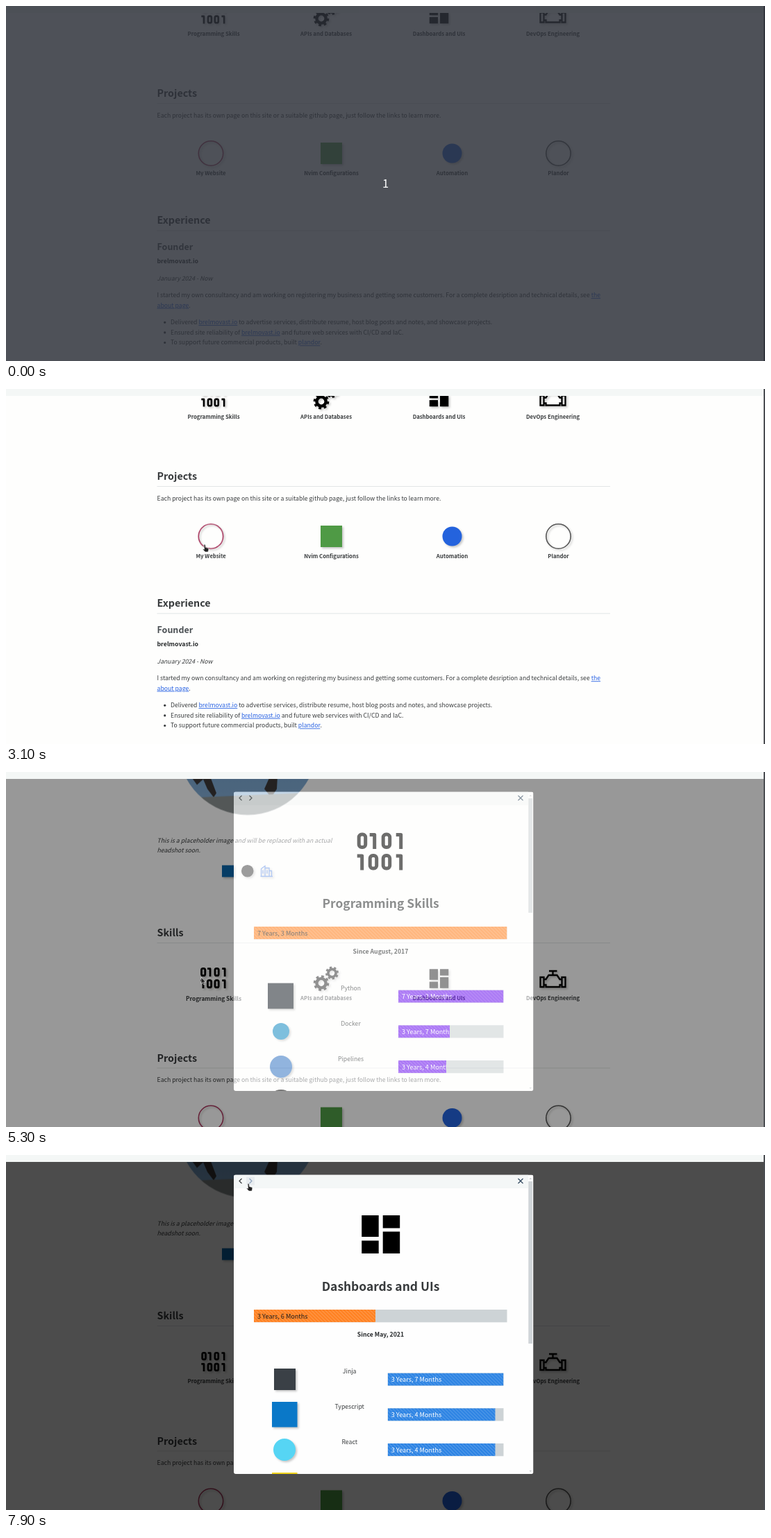
These frames come from a looping animation (1093x512 px, 8 s). An HTML page:

```html
<!DOCTYPE html>
<html lang="en">
<head>
<meta charset="utf-8">
<title>Portfolio walkthrough</title>
<style>
html, body { margin: 0; width: 100%; height: 100%; overflow: hidden; background: #fefefd; }
svg#stage { display: block; width: 100vw; height: 100vh; }
text { font-family: "Noto Sans CJK JP", "Noto Sans CJK SC", "Noto Sans CJK KR", "Noto Sans CJK TC", "Noto Sans CJK", "Noto Sans", sans-serif; fill: #373a3c; white-space: pre; }
.b { font-weight: 700; }
.i { font-style: italic; }
.m { text-anchor: middle; }
.link { fill: #2761e3; text-decoration: underline; }
.term text { font-family: "Noto Sans Mono", "DejaVu Sans Mono", monospace; font-size: 7.675px; font-weight: 700; fill: #f2b81f; }
.icon { filter: drop-shadow(2px 2px 1.5px rgba(0, 0, 0, .22)); }
.line { fill: none; stroke: #000; }

.scroll, .site, .skill, .dialog, .pointer { animation: 8s linear infinite; }
.count, .term, .status, .arrow, .hand, .next, .p0, .p1, .p2 { animation: 8s step-end infinite; }
.scroll { animation-name: scroll; }
.site { animation-name: site; }
.skill { animation-name: skill; }
.dialog { animation-name: dialog; }
.pointer { animation-name: pointer; }
.count { animation-name: count; }
.term { animation-name: term; }
.status { animation-name: status; }
.arrow { animation-name: arrow; }
.hand { animation-name: hand; }
.next { animation-name: next; }
.p0 { animation-name: p0; }
.p1 { animation-name: p1; }
.p2 { animation-name: p2; }
.stripes { animation: stripes 1s linear infinite; }

@keyframes count { 0% { opacity: 1 } 1.25%, 100% { opacity: 0 } }
@keyframes term { 0% { opacity: 0 } 6.25% { opacity: 1 } 22.5%, 100% { opacity: 0 } }
@keyframes status { 0% { opacity: 0 } 40% { opacity: 1 } 57.5%, 100% { opacity: 0 } }
@keyframes scroll {
  0%, 47.8% { transform: translateY(0) }
  50% { transform: translateY(76.5px) }
  52.5% { transform: translateY(205px) }
  55%, 100% { transform: translateY(286.5px) }
}
@keyframes site {
  0%, 38.75% { transform: none }
  43.75%, 51.25% { transform: translateY(-15.7px) scale(1.2) }
  55%, 100% { transform: none }
}
@keyframes skill {
  0%, 60% { transform: none }
  63.75% { transform: translateY(-8px) scale(1.15) }
  66.25% { transform: translateY(-1px) scale(1.07) }
  68.75%, 100% { transform: none }
}
@keyframes dialog { 0%, 63.75% { opacity: 0 } 66.25% { opacity: .57 } 67.5%, 100% { opacity: 1 } }
@keyframes p0 { 0% { opacity: 1 } 91.25%, 100% { opacity: 0 } }
@keyframes p1 { 0% { opacity: 0 } 91.25% { opacity: 1 } 96.25%, 100% { opacity: 0 } }
@keyframes p2 { 0% { opacity: 0 } 96.25%, 100% { opacity: 1 } }
@keyframes next { 0% { opacity: 0 } 87.5%, 100% { opacity: 1 } }
@keyframes arrow {
  0% { opacity: 0 } 28.75% { opacity: 1 } 38.75% { opacity: 0 } 53.75% { opacity: 1 }
  60% { opacity: 0 } 64.4% { opacity: 1 } 87.5%, 100% { opacity: 0 }
}
@keyframes hand {
  0% { opacity: 0 } 38.75% { opacity: 1 } 53.75% { opacity: 0 } 60% { opacity: 1 }
  64.4% { opacity: 0 } 87.5%, 100% { opacity: 1 }
}
@keyframes pointer {
  0%, 28.75% { transform: translate(545px, 30px) }
  38.75%, 57.5% { transform: translate(284px, 224px) }
  62.5%, 68.75% { transform: translate(281px, 296px) }
  78.75% { transform: translate(392px, 62px) }
  82.5% { transform: translate(388px, 45px) }
  88.75%, 100% { transform: translate(347px, 41px) }
}
@keyframes stripes { from { transform: translateX(5px) } to { transform: none } }
</style>
</head>
<body>
<svg id="stage" viewBox="0 0 1093 512" preserveAspectRatio="none">
  <defs>
    <pattern id="hatch" width="5" height="5" patternUnits="userSpaceOnUse">
      <path d="M0 0H2.5L5 2.5V5zM0 2.5V5H2.5z" fill="#fff" fill-opacity=".17"/>
    </pattern>
    <linearGradient id="sky" x1="0" y1="0" x2="0" y2="1">
      <stop offset="0" stop-color="#5f94cc"/><stop offset="1" stop-color="#86aed3"/>
    </linearGradient>
    <clipPath id="round"><circle cx="348" cy="-325" r="100.5"/></clipPath>
    <clipPath id="box"><rect x="328" y="28.5" width="431.5" height="431.5" rx="3"/></clipPath>

    <g id="zero"><rect x="2.5" y="2.5" width="9.5" height="18.5" rx="4" class="line" stroke-width="5"/></g>
    <g id="one"><path d="M0 3H7V23.5" class="line" stroke-width="5" stroke-linejoin="round"/></g>
    <g id="binary">
      <use href="#zero" x="-34" y="-27"/><use href="#one" x="-16" y="-27"/>
      <use href="#zero" x="1" y="-27"/><use href="#one" x="22" y="-27"/>
      <use href="#one" x="-34" y="3.5"/><use href="#zero" x="-18" y="3.5"/>
      <use href="#zero" x="1" y="3.5"/><use href="#one" x="22" y="3.5"/>
    </g>
    <g id="cog" class="line">
      <circle r="6.6" stroke-width="4.4"/>
      <circle r="9.6" stroke-width="3.4" pathLength="16" stroke-dasharray="1"/>
    </g>
    <g id="gears">
      <use href="#cog" transform="translate(-7 6.5)"/>
      <use href="#cog" transform="translate(8.5 -8) rotate(20) scale(.84)"/>
    </g>
    <path id="board" d="M-27.5-27.5h24.5v31h-24.5zM3-27.5h24.5v18.5h-24.5zM-27.5 9h24.5v18.5h-24.5zM3-4h24.5v31.5h-24.5z"/>
    <path id="valve" class="line" stroke-width="2.3" d="M-5.5-11H6M0-11V-5M-18-2h5v14h-5zM13-2h5v14h-5zM-13 1h3l4-6H6l4 6h3M-13 9h3v3H10v-3h3"/>
  </defs>
</svg>
<script>
const INK = '#373a3c';
const text = (x, y, size, str, cls = '', fill = '') =>
  `<text x="${x}" y="${y}" font-size="${size}" class="${cls}"${fill && ` style="fill:${fill}"`}>${str}</text>`;
const rect = (x, y, w, h, fill, more = '') =>
  `<rect x="${x}" y="${y}" width="${w}" height="${h}" fill="${fill}" ${more}/>`;
const disc = (x, y, r, fill, more = '') => `<circle cx="${x}" cy="${y}" r="${r}" fill="${fill}" ${more}/>`;
const ring = color => disc(0, 0, 17.7, 'none', `stroke="${color}" stroke-width="1.6"`);
const use = (id, scale, x = 0, y = 0) => `<use href="#${id}" transform="translate(${x} ${y}) scale(${scale})"/>`;
const link = str => `<tspan class="link">${str}</tspan>`;

const card = (x, y, label, icon, cls = '') =>
  `<g transform="translate(${x} ${y})"><g class="${cls}"><g class="icon">${icon}</g>${text(0, 31, 7.77, label, 'b m')}</g></g>`;
const heading = (y, str) => text(217.5, y, 14.3, str, 'b') + rect(217.5, y + 9, 652.5, 1, '#e2e5e6');

const page = `<g class="scroll">
  <g clip-path="url(#round)">
    ${rect(247, -426, 202, 202, 'url(#sky)')}
    <path d="M252-300L275-268L284-276L290-262L299-250L303-256L294-280H380L372-262L382-250L390-262L392-300z" fill="#3b3838"/>
    <path d="M280-250L420-256L440-220H280z" fill="#8a9192"/>
  </g>
  ${text(217.5, -184.7, 8.71, 'This is a placeholder image and will be replaced with an actual', 'i')}
  ${text(217.5, -171, 8.71, 'headshot soon.', 'i')}
  <g class="icon">
    ${rect(311, -152, 17, 17, '#0a66a8')}
    ${disc(347.7, -143.7, 8.8, '#1b1b1b')}
    <path d="M367.5-136V-147L373-151V-136M373-148H379V-136M379-144H382.5V-136M366.5-136H384M370-145v5M376-145v5" fill="none" stroke="#4d83e6" stroke-width="1.3"/>
  </g>
  ${heading(-49.5, 'Skills')}
  ${card(299, 11.5, 'Programming Skills', use('binary', .52), 'skill')}
  ${card(461, 11.5, 'APIs and Databases', use('gears', 1))}
  ${card(623.5, 11.5, 'Dashboards and UIs', use('board', .5))}
  ${card(787.5, 11.5, 'DevOps Engineering', use('valve', 1))}
  ${heading(131, 'Projects')}
  ${text(217.5, 160.5, 8.71, 'Each project has its own page on this site or a suitable github page, just follow the links to learn more.')}
  ${card(295, 212.5, 'My Website', ring('#a8395f'), 'site')}
  ${card(468.5, 212.5, 'Nvim Configurations', rect(-15.5, -15.5, 31, 31, '#4f9a45'))}
  ${card(642.5, 212.5, 'Automation', disc(0, 0, 14, '#2463dd'))}
  ${card(795.5, 212.5, 'Plandor', ring('#555'))}
  ${heading(314.3, 'Experience')}
  ${text(217.5, 352, 12.5, 'Founder', 'b', '#4b5054')}
  ${text(217.5, 371.2, 8.73, 'brelmovast.io', 'b', '#26292b')}
  ${text(217.5, 395.5, 8.71, 'January 2024 - Now', 'i')}
  ${text(217.5, 420.3, 8.71, 'I started my own consultancy and am working on registering my business and getting some customers. For a complete desription and technical details, see ' + link('the'))}
  ${text(217.5, 434.6, 8.71, link('about page') + '.')}
  ${[
    `Delivered ${link('brelmovast.io')} to advertise services, distribute resume, host blog posts and notes, and showcase projects.`,
    `Ensured site reliability of ${link('brelmovast.io')} and future web services with CI/CD and IaC.`,
    `To support future commercial products, built ${link('plandor')}.`
  ].map((str, n) => disc(228.7, 456.3 + 14.6 * n, 1.6, INK) + text(237, 459.2 + 14.6 * n, 8.71, str)).join('')}
</g>
${rect(0, 0, 1091, 10, '#f4f7f6')}
<g class="status">
  <path d="M0 502H57q3 0 3 3V512H0z" fill="#1c1c20"/>
  ${text(-1, 510, 8.2, 'localhost:3000', '', '#e8e8e8')}
</g>`;

/* Clipped progress bar with running stripes */
const bar = (x, y, w, done, color, label, ink) => `${rect(x, y, w, 18.3, '#cdd3d6')}
  <svg x="${x}" y="${y}" width="${done}" height="18.3">
    ${rect(0, 0, done, 18.3, color)}
    ${rect(-5, 0, done + 10, 18.3, 'url(#hatch)', 'class="stripes"')}
    ${text(5, 12.8, 9.1, label, '', ink)}
  </svg>`;

const panel = (n, p) => `<g class="p${n}">
  ${use(p.icon, p.scale, 539.7, 114.5)}
  ${text(539.5, 196, 17.4, p.title, 'b m')}
  ${bar(357, 223, 364.5, p.done, '#ff7e1c', p.total, '#1c1c1c')}
  ${text(539.5, 261.5, 8.7, 'Since ' + p.since, 'b m', '#26292b')}
  <g class="icon">${p.badges}</g>
  ${p.rows.map(([name, done, label], k) => {
    const y = 314.4 + 50.8 * k;
    return text(p.labelX, y + .6, 8.71, name, 'm') + bar(p.barX, y, 716.5 - p.barX, done, p.color, label, '#fff');
  }).join('')}
  ${rect(752.3, 38, 5.7, p.thumb, '#d0d5d8')}
</g>`;

const panels = [
  {
    icon: 'binary', scale: 1, title: 'Programming Skills', done: 364.5, total: '7 Years, 3 Months',
    since: 'August, 2017', thumb: 165, color: '#6a10f0', labelX: 496.5, barX: 565,
    badges: rect(377, 304.5, 37, 37, '#242a33') + disc(396, 374, 12, '#1e8fc6') + disc(396, 425, 16, '#3f7cc8') + disc(396, 476, 18, '#111'),
    rows: [['Python', 151.5, '7 Years, 3 Months'], ['Docker', 74, '3 Years, 7 Months'], ['Pipelines', 69, '3 Years, 4 Months']]
  },
  {
    icon: 'gears', scale: 1.5, title: 'APIs and Databases', done: 182, total: '3 Years, 7 Months',
    since: 'April, 2021', thumb: 200, color: '#3fb618', labelX: 495.5, barX: 557,
    badges: disc(398, 323, 17, '#159588') + disc(398, 374, 15, '#2d6a8d') + rect(383, 410, 30, 30, '#3d8b45'),
    rows: [['FastAPI', 159.5, '3 Years, 7 Months'], ['MySQL', 150, '3 Years, 4 Months'], ['MongoDB', 150, '3 Years, 4 Months']]
  },
  {
    icon: 'board', scale: 1, title: 'Dashboards and UIs', done: 175, total: '3 Years, 6 Months',
    since: 'May, 2021', thumb: 234, color: '#2780e3', labelX: 494.7, barX: 549.7,
    badges: rect(386, 308, 31, 31, '#3a4046') + rect(383, 356, 36.5, 36.5, '#0a78c8') + disc(401, 425, 16, '#56d5f4') + rect(383, 458, 36.5, 36.5, '#f2d51d'),
    rows: [['Jinja', 166.8, '3 Years, 7 Months'], ['Typescript', 155, '3 Years, 4 Months'], ['React', 155, '3 Years, 4 Months']]
  }
];

const stroke = (d, color, w = 1.2) => `<path d="${d}" fill="none" stroke="${color}" stroke-width="${w}"/>`;
const dialog = `<g class="dialog">
  ${rect(0, 10, 1091, 502, '#000', 'fill-opacity=".7"')}
  <g clip-path="url(#box)">
    ${rect(328, 28.5, 431.5, 431.5, '#fefefe')}
    ${rect(328, 28.5, 424, 19.5, '#f4f7f7')}
    ${stroke('M339.5 34L336 37.5L339.5 41M350.5 34L354 37.5L350.5 41', INK)}
    <g class="next">${rect(346, 31.5, 12, 12, '#e8ecef')}${stroke('M350.5 34L354 37.5L350.5 41', '#8ea4bd')}</g>
    ${stroke('M737.5 34L744.5 41M744.5 34L737.5 41', '#31475e')}
    <path d="M753.5 35h3.5l-1.75-2zM753.5 455h3.5l-1.75 2z" fill="#c4c9cc"/>
    ${panels.map((p, n) => panel(n, p)).join('')}
  </g>
</g>`;

const slash = '/';
const clip = 'output.gif';
const peek = "'Peek 2024-11-11 15-48.gif'";
const done = '... Done';
const repo = `http:${slash.repeat(2)}us.archive.ubuntu.com/ubuntu jammy/universe amd64`;
const clipPath = `/home/marlon/Videos/${clip}`;
const tint = (color, str) => `<tspan style="fill:${color}">${str}</tspan>`;
const lines = `    Metadata:
      title           : Video
      encoder         : Lavc58.134.100 gif
frame=  235 fps= 73 q=-0.0 Lsize=    5642kB time=00:00:15.25 bitrate=3031.0kbits/s speed= 4.7x
video:5642kB audio:0kB subtitle:0kB other streams:0kB global headers:0kB muxing overhead: 0.000346%
  open ${clip}
  sudo apt install peel
Reading package lists${done}
Building dependency tree${done}
Reading state information${done}
${tint('#d0342c', 'E:')} Unable to locate package peel
  sudo apt install peek
Reading package lists${done}
Building dependency tree${done}
Reading state information${done}
The following packages were automatically installed and are no longer required:
  libmsgpackc2 libtermkey1 libtree-sitter0 libunibilium4 libvterm0 lua-luv neovim-runtime python3-greenlet python3-neovim python3-pynvim
Use 'sudo apt autoremove' to remove them.
The following additional packages will be installed:
  libkeybinder-3.0-0
Suggested packages:
  gifski
The following NEW packages will be installed:
  libkeybinder-3.0-0 peek
0 upgraded, 2 newly installed, 0 to remove and 1 not upgraded.
Need to get 211 kB of archives.
After this operation, 1,028 kB of additional disk space will be used.
Do you want to continue? [Y/n] Y
Get:1 ${repo} libkeybinder-3.0-0 amd64 0.3.2-1.1 [8,916 B]
Get:2 ${repo} peek amd64 1.5.1+git20211214-1 [202 kB]
Fetched 211 kB in 1s (335 kB/s)
Selecting previously unselected package libkeybinder-3.0-0:amd64.
(Reading database ... 258632 files and directories currently installed.)
Preparing to unpack .../libkeybinder-3.0-0_0.3.2-1.1_amd64.deb ...
Unpacking libkeybinder-3.0-0:amd64 (0.3.2-1.1) ...
Selecting previously unselected package peek.
Preparing to unpack .../peek_1.5.1+git20211214-1_amd64.deb ...
Unpacking peek (1.5.1+git20211214-1) ...
Setting up libkeybinder-3.0-0:amd64 (0.3.2-1.1) ...
Setting up peek (1.5.1+git20211214-1) ...
${['mailcap (3.70+nmu1ubuntu1)', 'desktop-file-utils (0.26-1ubuntu3)', 'hicolor-icon-theme (0.17-2)',
  'gnome-menus (3.36.0-1ubuntu3)', 'libglib2.0-0:amd64 (2.72.4-0ubuntu2.3)', 'libc-bin (2.35-0ubuntu3.8)',
  'man-db (2.10.2-1)'].map(s => `Processing triggers for ${s} ...`).join('\n')}
  cd ..
  open ${clip}
gio: file:${slash.repeat(2)}${clipPath}: Error when getting information for file "${clipPath}": No such file or directory
  ls
${tint('#c936e8', peek)}   ${tint('#1e88e5', 'Screencasts')}
  open ${peek}
${tint('#22a7e8', '~/Videos')}`.split('\n');

const terminal = `<g class="term">
  ${rect(0, 0, 1091, 512, '#180e0c', 'fill-opacity=".92"')}
  ${lines.map((str, n) => text(-4.6, 4.6 + 9.2 * n, 7.675, str)).join('')}
  ${text(1008, 491.6, 7.675, 'Py Blog 15:49:16', '', '#25a3a8')}
  ${stroke('M1086 489h4v8h3', '#8a8580', .8)}
  ${rect(5.5, 493.5, 3.5, 9, 'none', 'stroke="#a3271f" stroke-width=".9"')}
  ${rect(0, 504.5, 5, 8, '#8d8a88')}${rect(7, 504.5, 278, 8, '#e9e8e6')}
  ${rect(286, 504.5, 5, 8, '#a9a6a4')}${rect(292, 504.5, 3, 8, '#777')}${rect(296, 504.5, 3, 8, '#4b4644')}
  ${text(14, 512, 7.675, 'marlon@marlon-Feldbook-ORUNLaptop-T2846QB-R2846QB:~/Videos', 'i', '#4a4644')}
  ${rect(303, 504.5, 3, 8, '#4b4644')}${rect(308, 504.5, 4, 8, '#6b6765')}${rect(314, 504.5, 30, 8, '#8d8a88')}
  ${rect(346, 504.5, 3, 8, '#6b6765')}${rect(351, 504.5, 3, 8, '#4b4644')}
  ${text(322, 512, 7.675, 'vim', '', '#2b2523')}
</g>`;

const overlays = `<g class="count">
  ${rect(0, 0, 1093, 512, '#2d3038', 'fill-opacity=".84"')}
  ${text(546.5, 262, 16.5, '1', 'm', '#fff')}
</g>
<g class="pointer" fill="#222" stroke="#fff" stroke-width=".6">
  <path class="arrow" d="M0 0V9.5L2.2 7.5L3.8 11L5.2 10.3L3.7 7H6.6z"/>
  <path class="hand" d="M1 .5q1-1 2 0L3.5 4.5L7.3 5.5Q8 6 7.8 8L7 11H2.8L-.5 7.5Q-.3 6.3 1.5 7.3z"/>
</g>`;

document.getElementById('stage').insertAdjacentHTML('beforeend',
  rect(0, 0, 1093, 512, '#fefefd') + page + dialog + rect(1091, 0, 2, 512, '#4b4e52') + terminal + overlays);
</script>
</body>
</html>
```
